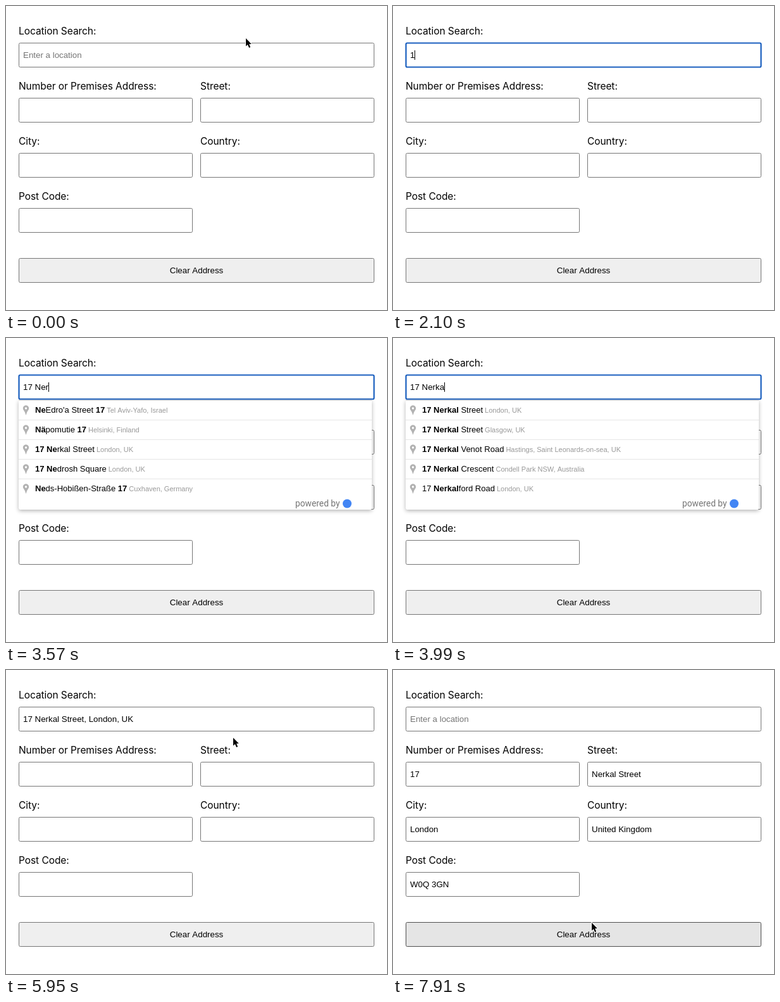
An HTML page with a canvas that plays this animation: 602x480 px, repeating every 8000 ms.

```html
<!DOCTYPE html>
<html lang="en">
<head>
<meta charset="utf-8">
<title>Address form</title>
<style>
  html, body { margin: 0; width: 100%; height: 100%; overflow: hidden; background: #fff; }
  canvas { display: block; width: 602px; height: 480px; }
</style>
</head>
<body>
<canvas id="stage"></canvas>
<script>
const W = 602, H = 480, LOOP = 8000, STEP = 70;
const canvas = document.getElementById('stage');
const ctx = canvas.getContext('2d');
const ratio = window.devicePixelRatio || 1;
canvas.width = W * ratio;
canvas.height = H * ratio;

const SANS = '"Liberation Sans", Arial, sans-serif';
const INPUT_FONT = '13.333px ' + SANS;
const LABEL_FONT = '15.5px Inter, sans-serif';

const FOCUS = 770, PICK = 5950, FILL = 6160;
const HIDE_CURSOR = 2100, SHOW_CURSOR = 4620;

const search = { label: 'Location Search:', x: 20, y: 58, w: 562 };
const fields = [
  { label: 'Number or Premises Address:', x: 20, y: 145, w: 275, value: '17' },
  { label: 'Street:', x: 307, y: 145, w: 275, value: 'Nerkal Street' },
  { label: 'City:', x: 20, y: 232, w: 275, value: 'London' },
  { label: 'Country:', x: 307, y: 232, w: 275, value: 'United Kingdom' },
  { label: 'Post Code:', x: 20, y: 319, w: 275, value: 'W0Q 3GN' }
];
const FIELD_H = 39;
const button = { x: 20, y: 398, w: 562 };

const query = '17 Nerkal';
const keyTimes = [2100, 2240, 2450, 2940, 3150, 3570, 3780, 3920, 4060];

// Asterisks mark the bold part, the bar starts the grey part.
const lists = [
  { at: 2520, rows: [
    'Sjullebden *17*|Ishøj, Denmark',
    'Hupeltonatie *17*|Helsinki, Finland',
    'Zeldona Bryzkamewskiego *17*|Gdańsk, Poland',
    'Calle de la Fova, *17*|Madrid, Spain',
    'Jedo Swola Trebnuska *17*|Warsaw, Poland'
  ] },
  { at: 3430, rows: [
    "*Ne*Edro'a Street *17*|Tel Aviv-Yafo, Israel",
    '*Nä*pomutie *17*|Helsinki, Finland',
    '*17 Ne*rkal Street|London, UK',
    '*17 Ne*drosh Square|London, UK',
    '*Ne*ds-Hobißen-Straße *17*|Cuxhaven, Germany'
  ] },
  { at: 3920, rows: [
    '*17 Nerkal* Street|London, UK',
    '*17 Nerkal* Street|Glasgow, UK',
    '*17 Nerkal* Venot Road|Hastings, Saint Leonards-on-sea, UK',
    '*17 Nerkal* Crescent|Condell Park NSW, Australia',
    '17 *Nerkal*ford Road|London, UK'
  ] }
];

// time, x, y of the pointer
const path = [
  [0, 378, 50], [210, 378, 79], [4550, 378, 79], [4690, 364, 87],
  [4830, 358, 106], [7630, 358, 106], [7910, 313, 398], [LOOP, 313, 398]
];

function pointerAt(t) {
  const i = Math.max(1, path.findIndex(p => p[0] > t));
  const [t0, x0, y0] = path[i - 1];
  const [t1, x1, y1] = path[i];
  const u = (t - t0) / (t1 - t0);
  const k = u * u * (3 - 2 * u);
  return { x: x0 + (x1 - x0) * k, y: y0 + (y1 - y0) * k };
}

const inside = (p, b) =>
  p.x >= b.x && p.x < b.x + b.w && p.y >= b.y && p.y < b.y + FIELD_H;

function text(str, x, y, font, color) {
  ctx.font = font;
  ctx.fillStyle = color;
  ctx.fillText(str, x, y);
  return x + ctx.measureText(str).width;
}

function box(b, fill, stroke, line) {
  ctx.beginPath();
  ctx.roundRect(b.x + 0.5, b.y + 0.5, b.w - 1, FIELD_H - 1, 2);
  ctx.fillStyle = fill;
  ctx.fill();
  ctx.lineWidth = line;
  ctx.strokeStyle = stroke;
  ctx.stroke();
}

function field(f, value, color, focused) {
  ctx.letterSpacing = '-0.06px';
  text(f.label, f.x, f.y - 13, LABEL_FONT, '#000');
  ctx.letterSpacing = '0px';
  box(f, '#fff', focused ? '#1a5fbf' : '#767676', focused ? 2.2 : 1);
  return text(value, f.x + 7, f.y + 24, INPUT_FONT, color);
}

function pin(x, y) {
  ctx.fillStyle = '#b2b2b2';
  ctx.beginPath();
  ctx.arc(x, y, 4.7, Math.PI * 0.9, Math.PI * 2.1);
  ctx.quadraticCurveTo(x + 1.4, y + 5.5, x, y + 11);
  ctx.quadraticCurveTo(x - 1.4, y + 5.5, x - 4.5, y + 1.5);
  ctx.fill();
  ctx.fillStyle = '#fff';
  ctx.beginPath();
  ctx.arc(x, y, 1.7, 0, 7);
  ctx.fill();
}

function suggestions(rows, hover) {
  ctx.save();
  ctx.shadowColor = 'rgba(0,0,0,0.3)';
  ctx.shadowBlur = 6 * ratio;
  ctx.shadowOffsetY = 2 * ratio;
  ctx.fillStyle = '#fff';
  ctx.beginPath();
  ctx.roundRect(20, 98, 558, 173, 2);
  ctx.fill();
  ctx.restore();

  rows.forEach((row, i) => {
    const top = 98 + 31 * i;
    if (i === hover) {
      ctx.fillStyle = '#fafafa';
      ctx.fillRect(20, top + 1, 558, 30);
    }
    ctx.fillStyle = i ? '#e6e6e6' : '#d9d9d9';
    ctx.fillRect(20, top, 558, 1);
    pin(31.5, top + 13);
    const [main, place] = row.split('|');
    let x = 46;
    main.split('*').forEach((part, n) => {
      x = text(part, x, top + 20, (n % 2 ? 'bold ' : '') + '13px ' + SANS, '#000');
    });
    text(place, x + 3, top + 20, '11px ' + SANS, '#999');
  });

  text('powered by', 457, 266, '13.8px Roboto, sans-serif', '#757575');
  ctx.fillStyle = '#4285f4';
  ctx.beginPath();
  ctx.arc(539, 261.5, 7, 0, 7);
  ctx.fill();
}

function arrow(p) {
  ctx.save();
  ctx.translate(p.x + 1, p.y + 1);
  ctx.beginPath();
  [[0, 0], [0, 12.6], [2.9, 10], [5.1, 15], [7.2, 14.1], [5.1, 9.3], [8.8, 9]]
    .forEach(([x, y]) => ctx.lineTo(x, y));
  ctx.closePath();
  ctx.lineJoin = 'round';
  ctx.lineWidth = 2;
  ctx.strokeStyle = '#fff';
  ctx.stroke();
  ctx.fillStyle = '#000';
  ctx.fill();
  ctx.restore();
}

function beam(p) {
  ctx.save();
  ctx.translate(Math.round(p.x) + 0.5, Math.round(p.y) + 0.5);
  ctx.beginPath();
  for (const s of [-1, 1]) {
    ctx.moveTo(-3, 7.5 * s);
    ctx.quadraticCurveTo(0, 7.5 * s, 0, 5 * s);
    ctx.quadraticCurveTo(0, 7.5 * s, 3, 7.5 * s);
  }
  ctx.moveTo(0, -6);
  ctx.lineTo(0, 6);
  ctx.moveTo(-2, 3);
  ctx.lineTo(2, 3);
  for (const [w, c] of [[2.6, '#fff'], [1.1, '#000']]) {
    ctx.lineWidth = w;
    ctx.strokeStyle = c;
    ctx.stroke();
  }
  ctx.restore();
}

function draw(t) {
  ctx.setTransform(ratio, 0, 0, ratio, 0, 0);
  ctx.fillStyle = '#fff';
  ctx.fillRect(0, 0, W, H);

  const pointer = pointerAt(t);
  const filled = t >= FILL;
  const focused = t >= FOCUS && t < PICK;
  const pressed = keyTimes.filter(k => k <= t);

  let value = query.slice(0, pressed.length);
  if (t >= PICK) value = query + ' Street, London, UK';
  if (filled) value = '';
  const end = field(search, value || 'Enter a location', value ? '#000' : '#757575', focused);

  const lastKey = pressed.length ? pressed[pressed.length - 1] : FOCUS;
  if (focused && (t - lastKey) % 1000 < 500) {
    ctx.fillStyle = '#000';
    ctx.fillRect(Math.round(value ? end : 27), 70, 1, 15);
  }

  for (const f of fields) field(f, filled ? f.value : '', '#000', false);

  const over = inside(pointer, button);
  box(button, over ? '#e5e5e5' : '#efefef', over ? '#4f4f4f' : '#767676', 1);
  ctx.textAlign = 'center';
  text('Clear Address', 301, 422, INPUT_FONT, '#000');
  ctx.textAlign = 'left';

  const list = focused && lists.filter(l => l.at <= t).pop();
  const shown = t < HIDE_CURSOR || t >= SHOW_CURSOR;
  if (list) suggestions(list.rows, shown ? Math.floor((pointer.y - 98) / 31) : -1);

  if (shown) {
    const targets = list ? [search] : [search, ...fields];
    (targets.some(f => inside(pointer, f)) ? beam : arrow)(pointer);
  }
}

const start = performance.now();
function tick() {
  const t = (performance.now() - start) % LOOP;
  draw(Math.floor(t / STEP) * STEP);
  requestAnimationFrame(tick);
}
tick();
</script>
</body>
</html>
```
